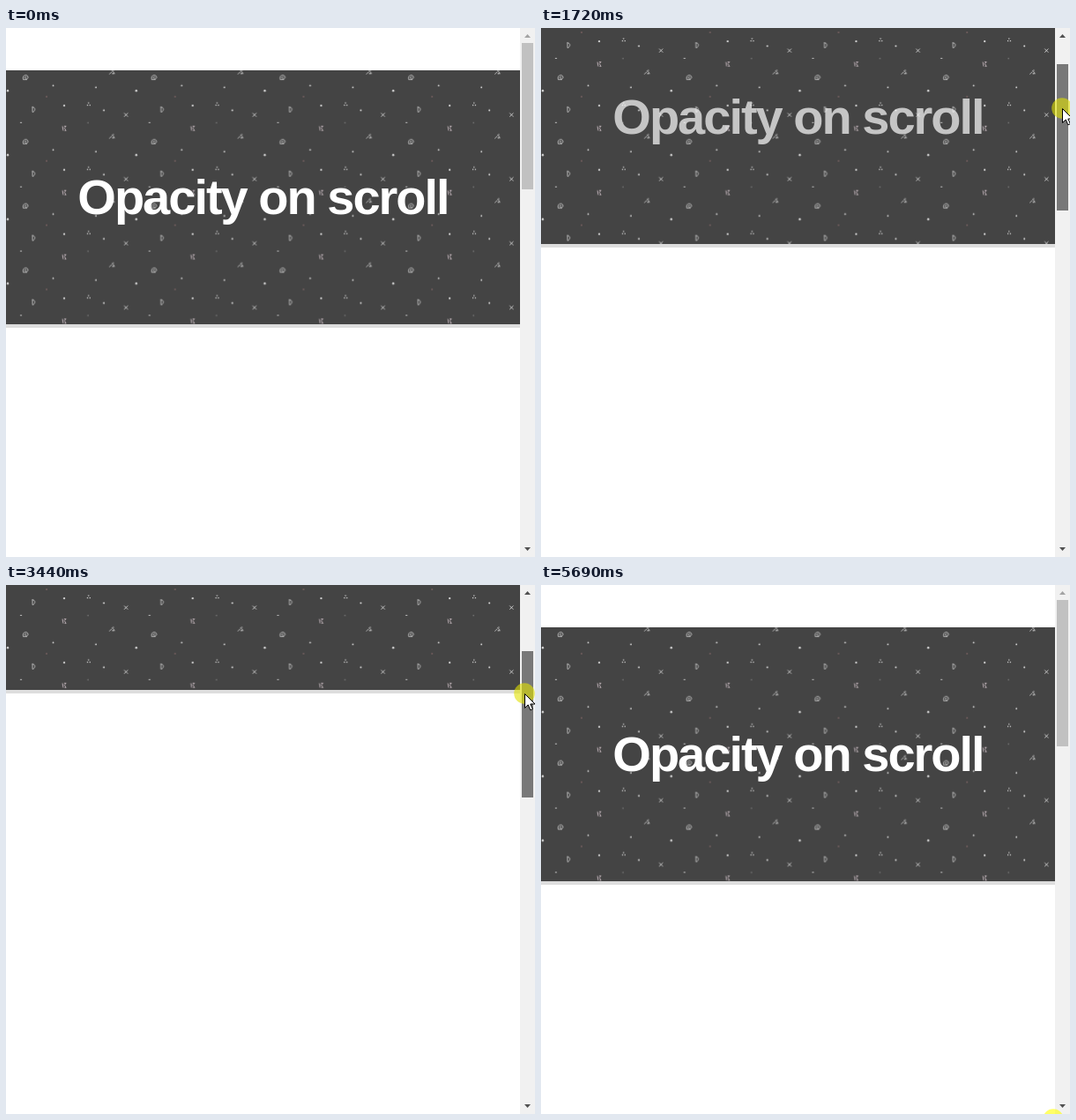
Recreate the animation shown at these times as an HTML page. Size 600 by 600 pixels, loop 5770 ms.

```html
<!DOCTYPE html>
<html lang="en">
<head>
<meta charset="utf-8">
<title>Opacity on scroll</title>
<style>
  html, body { margin: 0; height: 100%; overflow: hidden; background: #fff; }
  svg { display: block; width: 100vw; height: 100vh; }
  text { font: bold 56px "Liberation Sans", Arial, sans-serif; letter-spacing: -2px; }
</style>
</head>
<body>
<svg viewBox="0 0 600 600">
  <defs>
    <pattern id="marks" width="145.75" height="72.875" patternUnits="userSpaceOnUse">
      <rect width="146" height="73" fill="#444"/>
      <g fill="#ddd">
        <circle cx="2" cy="71.2" r="1.2"/>
        <circle cx="53.5" cy="65.3" r=".9"/>
        <circle cx="66" cy="15.2" r="1.1"/>
        <circle cx="102" cy="67.3" r=".9"/>
        <circle cx="111" cy="20.5" r="1"/>
        <path d="M15.6 35 17 33.6 18.4 35z"/>
        <path d="M93 11.6h1.2v1.2H93zM91.8 14H93v1.2h-1.2zM94.6 14h1.2v1.2h-1.2z"/>
      </g>
      <circle cx="46" cy="5" r=".8" fill="#957070"/>
      <circle cx="93" cy="34.6" r=".8" fill="#777"/>
      <g fill="none" stroke="#ccc" stroke-width=".8">
        <path d="M24 58.500h-4.500c-1.500-6 5.500-6.500 5.500-2.500 0 2.200-3.700 2.200-3.700.3 0-1.400 2-1.400 2-.2"/>
        <path d="M30 16.500v6M29.500 16.800c4.500-.3 4 5.200.500 5.700"/>
        <path d="M134 23.500l4.200 4.200M138.200 23.500l-4.200 4.200" stroke="#e4e4e4"/>
        <path d="M117 52.500l3-2.800M122.500 48c-2.400-.5-2.800 1.200-1 1.700 1.800.5.800 2.500-1 2h3"/>
        <path d="M64 38.500l.8 5M66 38.500h2l-1.800 2 1.800 3h-1.500" stroke="#d8c8d0"/>
      </g>
    </pattern>
  </defs>

  <rect id="header" width="583" height="288" fill="url(#marks)"/>
  <rect id="border" width="583" height="4" fill="#ddd"/>
  <text id="title" x="291.5" text-anchor="middle" fill="#fff">Opacity on scroll</text>

  <rect x="583" width="17" height="600" fill="#f1f1f1"/>
  <path id="up" d="M588 11h7l-3.500-4z"/>
  <path d="M588 589h7l-3.500 4z" fill="#505050"/>
  <rect id="thumb" x="585" width="13" height="166"/>

  <g id="cursor">
    <circle id="halo" r="11.8" fill-opacity=".6"/>
    <path d="M.5.500v16l3.700-3.600 2.600 6 2.600-1.200-2.600-5.700h5.200z" fill="#fff" stroke="#000"/>
  </g>
</svg>
<script>
const LOOP = 5770;
const $ = id => document.getElementById(id);
const set = (id, attrs) => {
  for (const k in attrs) $(id).setAttribute(k, attrs[k]);
};
const clamp = v => Math.max(0, Math.min(1, v));
const ramp = (t, from, to) => clamp((t - from) / (to - from));

// The drag goes down, rests and comes back, at slightly varying speed.
const scrollAt = t =>
  25 * ramp(t, 1110, 1250) + 134 * ramp(t, 1250, 2210) + 135 * ramp(t, 2210, 2840)
  - 77 * ramp(t, 3100, 3440) - 102 * ramp(t, 3440, 4020) - 115 * ramp(t, 4020, 4560);

const thumbAt = t => 17 + scrollAt(t) * .272;

function pointerAt(t) {
  if (t < 240) { // comes in from below
    const p = ramp(t, 20, 240);
    return [546 + 45 * p, 541 - 475 * p];
  }
  if (t < 4850) { // holds the thumb, drifts left, leaves at the top
    const drift = 18 * ramp(t, 2000, 4620) ** 3;
    return [591 - drift, thumbAt(t) + 49 - drift / 2 - Math.max(0, t - 4620) * .45];
  }
  if (t < 5250) return [600, 20 + (t - 4880) * 1.9]; // down the right edge
  const p = ramp(t, 5290, 5690); // peeks in at the bottom
  return [592 - 11 * p, 620 - 33 * Math.sin(2.7 * p)];
}

function draw(t) {
  const scroll = Math.round(scrollAt(t));
  const grey = Math.round(
    193 - 25 * ramp(t, 520, 690) - 48 * ramp(t, 870, 910) + 73 * ramp(t, 4850, 5110));
  const pressed = t >= 890 && t < 4850;

  set('header', { y: 48 - scroll });
  set('border', { y: 336 - scroll });
  set('title', { y: 211 - scroll, opacity: clamp((160 - scroll) / 100) });
  set('up', { fill: scroll ? '#505050' : '#a3a3a3' });
  set('thumb', { y: Math.floor(thumbAt(t)), fill: `rgb(${grey},${grey},${grey})` });
  set('halo', { fill: pressed ? '#e1e100' : '#ff0' });
  set('cursor', {
    transform: `translate(${pointerAt(t).map(Math.round)})`,
    visibility: t < 20 ? 'hidden' : 'visible'
  });
}

const start = performance.now();
function tick() {
  draw((performance.now() - start) % LOOP);
  requestAnimationFrame(tick);
}
draw(0);
requestAnimationFrame(tick);
</script>
</body>
</html>
```
